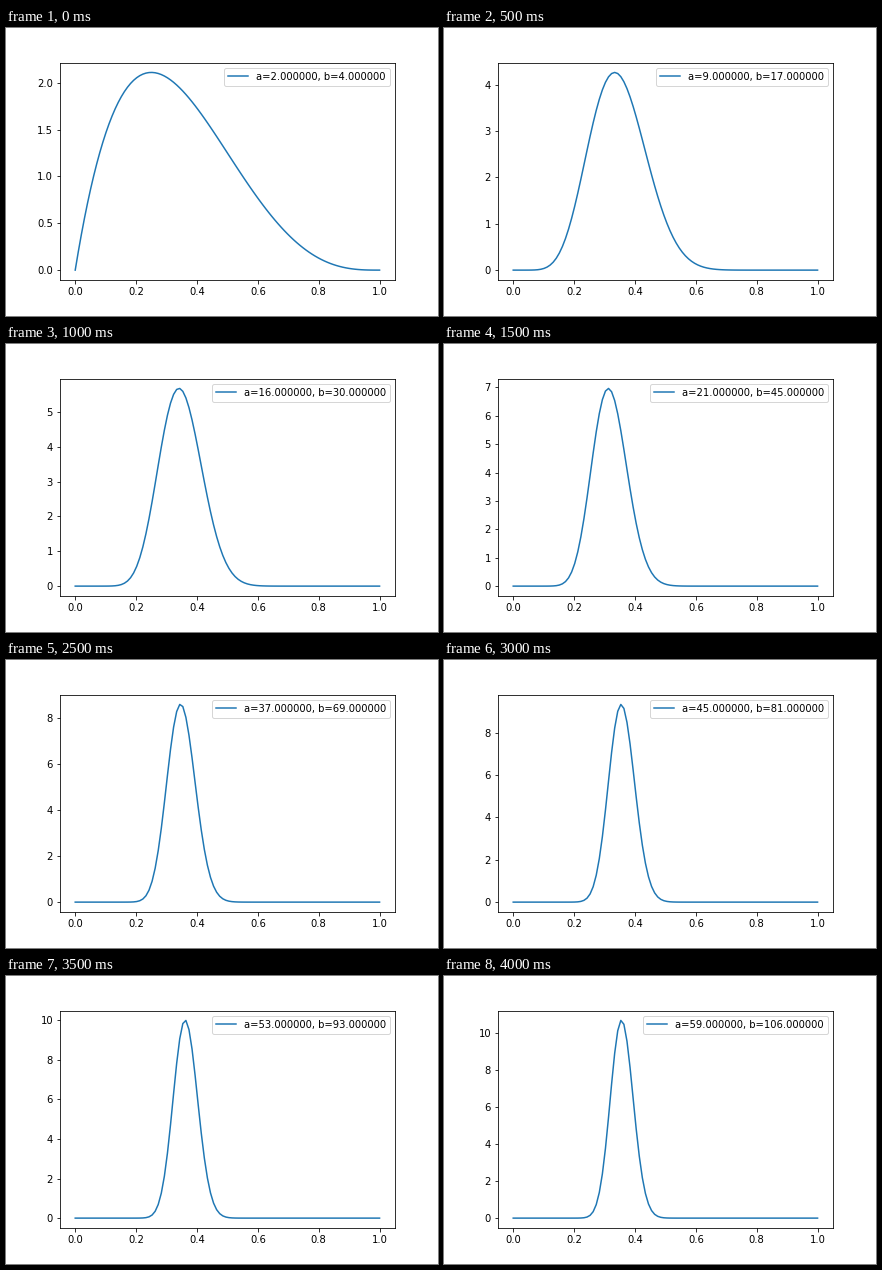
A matplotlib script that plays this animation: 432x288 px, repeating every 4.5 s.

```python
import math

import matplotlib.pyplot as plt
import numpy as np
from matplotlib.animation import FuncAnimation

PRIOR_A, PRIOR_B = 2, 4
TRIALS, BATCH = 159, 20
HITS = [7, 7, 5, 8, 8, 8, 8, 6]  # successes in each batch
STEP_MS = 500

x = np.linspace(0, 1, 100)


def posterior(step):
    """Beta parameters after the given number of batches."""
    seen = min(step * BATCH, TRIALS)
    hits = sum(HITS[:step])
    return PRIOR_A + hits, PRIOR_B + seen - hits


def beta_pdf(x, a, b):
    log_norm = math.lgamma(a + b) - math.lgamma(a) - math.lgamma(b)
    return math.exp(log_norm) * x ** (a - 1) * (1 - x) ** (b - 1)


fig, ax = plt.subplots(figsize=(6, 4), dpi=72)
fig.subplots_adjust(left=0.125, right=0.9, bottom=0.125, top=0.88)


def draw(step):
    a, b = posterior(step)
    ax.clear()
    ax.plot(x, beta_pdf(x, a, b), label=f"a={a:f}, b={b:f}")
    ax.legend(loc="upper right")
    return ax.get_children()


anim = FuncAnimation(fig, draw, frames=len(HITS) + 1,
                     init_func=lambda: draw(0),
                     interval=STEP_MS, repeat=True, repeat_delay=0)
plt.show()
```
